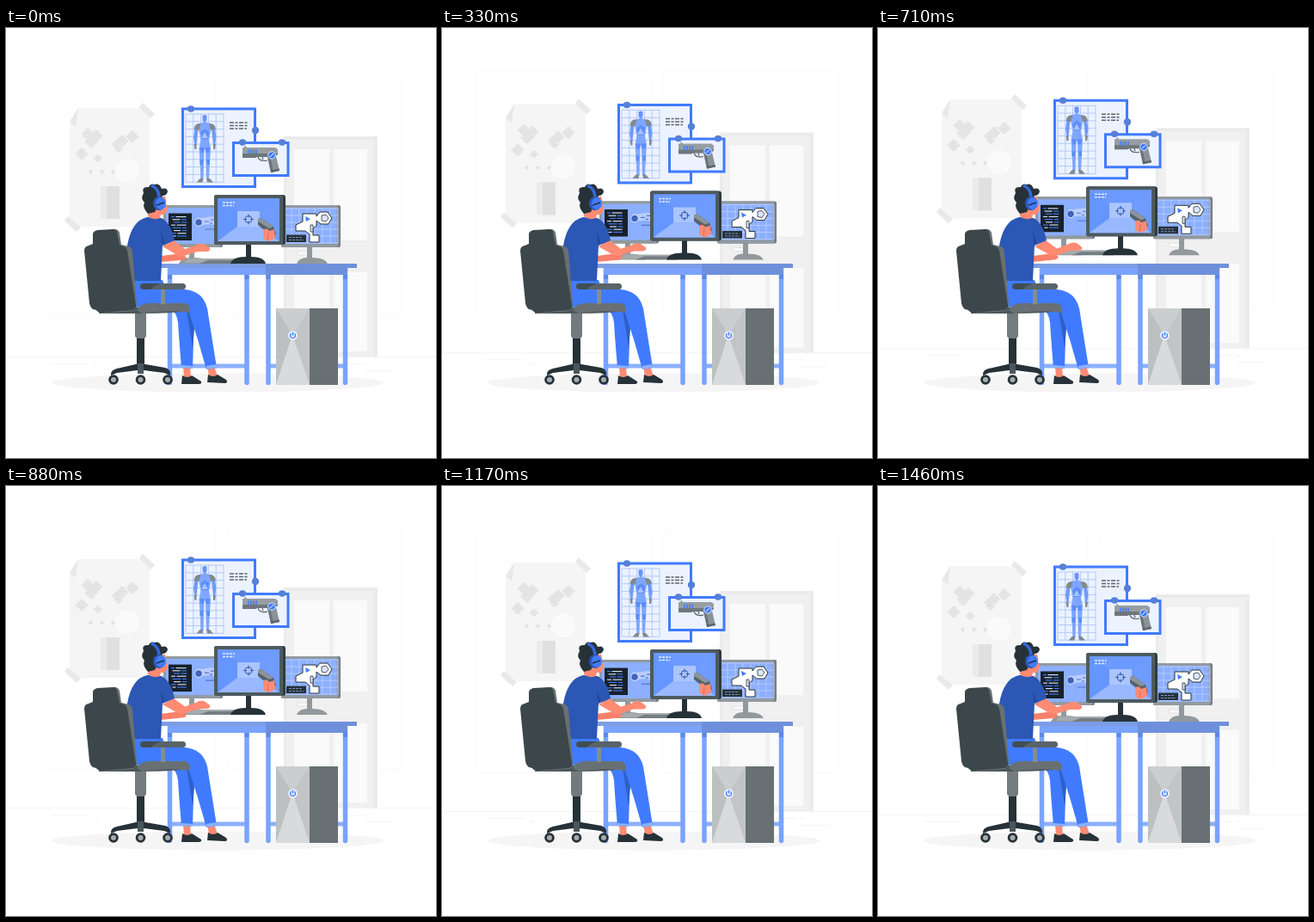
Animation of 500x500 px, one loop 1.5 s. Source, as an HTML page:

```html
<!DOCTYPE html>
<html lang="en">
<head>
<meta charset="utf-8">
<title>Game developer at a desk</title>
<style>
html, body { margin: 0; width: 100%; height: 100%; overflow: hidden; background: #fff; }
svg { display: block; width: 100vw; height: 100vh; }
</style>
</head>
<body>
<svg viewBox="0 0 500 500">
  <ellipse cx="246" cy="412.500" rx="193" ry="11" fill="#f5f5f5"/>

  <g class="float">
    <g fill="none" stroke="#fafafa">
      <rect x="39.500" y="54.500" width="204" height="283" rx="5"/>
      <rect x="256.500" y="54.500" width="204" height="283" rx="5"/>
    </g>
    <path d="M0 382.500H500" stroke="#f0f0f0" stroke-width=".8"/>
    <path d="M417 398.500H449M387 390.500H412M416 390.500H422M53 390.500H96M102 394.500H108" stroke="#f3f3f3" stroke-width=".8"/>

    <!-- door -->
    <path d="M323 126H432V382H323Z" fill="#ebebeb"/>
    <path d="M326 130H428V382H326Z" fill="#f0f0f0"/>
    <path d="M335 141H376V247H335ZM381 141H420V247H381ZM335 284H376V376H335ZM381 284H420V376H381Z" fill="#fafafa"/>
    <path d="M340 262H352" stroke="#e2e2e2" stroke-width="5" stroke-linecap="round"/>
    <path d="M340 262H352" stroke="#fafafa" stroke-width="3" stroke-linecap="round"/>

    <!-- paper poster -->
    <path d="M84 93H167V231H74V109Z" fill="#f5f5f5"/>
    <path d="M84 93L81 115L74 109Z" fill="#e8e8e8"/>
    <path d="M159 87L173 100L168 105L155 92ZM72 219L87 232L82 237L68 224Z" fill="#e9e9e9"/>
    <g id="pixels" fill="#e3e3e3"></g>
    <path d="M96 167H101M98.500 164.500V169.500M109 167H114M111.500 164.500V169.500M122 167H127M124.500 164.500V169.500" stroke="#e0e0e0" stroke-width="1.500"/>
    <circle cx="141" cy="166" r="14" fill="#fafafa"/>
    <path d="M110 184H132V222H110Z" fill="#ebebeb"/>
    <path d="M117 184H132V222H117Z" fill="#e0e0e0"/>

    <!-- blueprint -->
    <path d="M205.500 94H289.500V184.500H205.500Z" fill="#ecf2ff" stroke="#407bff" stroke-width="3"/>
    <path id="plan" fill="none" stroke="#a5c0fa" stroke-width=".8"/>
    <g id="figure"></g>
    <path d="M260 110H281M260 113.500H282M260 117H280" stroke="#59646a" stroke-width="1.400" stroke-dasharray="5 1.500 3 1.500"/>
    <path d="M264.500 133.500H328V171.500H264.500Z" fill="#ecf2ff" stroke="#407bff" stroke-width="3"/>
    <path d="M304 149H314L318 166L308 168Z" fill="#8b9398"/>
    <path d="M304 149H307L311 167.500L308 168Z" fill="#69747a"/>
    <path d="M275 139H277L278 136.500L280 139H313L316 141V147L312 149H275Z" fill="#979da1"/>
    <path d="M275 146H316V147L312 150H292L290 151H275Z" fill="#6d777c"/>
    <path d="M293 150Q295 156 304 154M298 150L299 153" fill="none" stroke="#59656b" stroke-width="1.200"/>
    <path d="M282 141.500V146M285 141.500V146M288 141.500V146M291 141.500V146" stroke="#407bff" stroke-width="1.600"/>
    <circle cx="309" cy="148" r="4.200" fill="#407bff" stroke="#dce7ff"/>
    <path d="M307 150L311 146" stroke="#fff"/>
    <path d="M308 165.500L317.500 163.500L318 166L308 168Z" fill="#58656c"/>
    <g fill="#5680d8">
      <ellipse cx="215" cy="94" rx="4.200" ry="3.700"/><circle cx="290" cy="119" r="4.200"/>
      <ellipse cx="275" cy="133" rx="4.200" ry="3.700"/><ellipse cx="321" cy="133" rx="4.200" ry="3.700"/>
    </g>
  </g>

  <!-- desk -->
  <path d="M190 390.500H280V395.500H190ZM305 390.500H394V395.500H305Z" fill="#8cb0ff"/>
  <path d="M190.500 280V412.500M280 280V412.500M305 280V412.500M394.500 280V412.500" stroke="#79a3ff" stroke-width="5.500" stroke-linecap="round"/>
  <path d="M188 279H397V287H188Z" fill="#79a3ff"/>
  <path d="M188 287H193V292H188ZM277.500 287H282.500V292H277.500ZM302.500 287H307.500V292H302.500ZM392 287H397V292H392Z" fill="#5c88e8"/>
  <path d="M179 274H408V279H179Z" fill="#7c9de4"/>
  <path d="M302 274H408V279H397V287H302Z" fill="#6e90dc"/>

  <!-- tower -->
  <path d="M353 326H386V415H353Z" fill="#687073"/>
  <path d="M314 326H353V415H314Z" fill="#cbcecf"/>
  <path d="M314 326L333 357L314 415Z" fill="#bcc0c1"/>
  <path d="M353 326L333 357L353 415Z" fill="#c1c5c6"/>
  <path d="M314 415L333 357L353 415Z" fill="#d8dadb"/>
  <circle cx="333.500" cy="357.500" r="5.500" fill="#e8eeff"/>
  <path d="M331.600 355.300A3 3 0 1 0 335.400 355.300M333.500 353.500V357.500" fill="none" stroke="#407bff" stroke-width="1.300"/>

  <g class="float">
    <!-- side screens -->
    <g id="sides"></g>
    <path d="M189 215.500H216V247H189Z" fill="#18212a"/>
    <g id="code"></g>
    <path d="M221 226Q220 219 226 221L240 219Q244 220 243 226Q242 231 238 228L228 229Q222 234 221 226Z" fill="#b9cdfd"/>
    <circle cx="224" cy="226" r="4.300" fill="#3f64bc" stroke="#dbe6ff"/>
    <path d="M231 225H236M238 223H242M237 227H240M232 234H243" stroke="#5375c9" stroke-width="1.200"/>
    <path id="grid" fill="none" stroke="#c4d5ff" stroke-width=".7"/>
    <path d="M345 216H361V219L365 214H374L379 221L375 228H366L361 224V230L357 233V241H364V249H353V240L348 236H337V229L345 225Z" fill="#fff" stroke="#263238" stroke-linejoin="round"/>
    <path d="M367 218L372 217L375 221L372 225L367 224ZM354 229H357V237H354Z" fill="#dce6ff" stroke="#263238" stroke-width=".8"/>
    <path d="M348 219L354 222L349 225Z" fill="#407bff"/>
    <path d="M326 240.500H349V249H326Z" fill="#263238"/>
    <path d="M329 243.500H345M329 246.500H346" stroke="#8fa7d8" stroke-width=".8" stroke-dasharray="3 1"/>

    <!-- keyboard -->
    <path d="M212 268H266L274 273H207Z" fill="#a5abad"/>
    <path d="M235 270H266L274 274H225Z" fill="#747d81"/>

    <!-- main screen -->
    <path d="M279 250H285V266Q300 266 302 274H261Q263 266 279 266Z" fill="#263238"/>
    <path d="M244 194H322Q325 194 325 197V249Q325 252 322 252H244Z" fill="#303b40"/>
    <path d="M244 194H320Q322 194 322 196V252H244Q242 252 242 250V196Q242 194 244 194Z" fill="#4d5a60"/>
    <path d="M246 198H318V248H246Z" fill="#6595ff"/>
    <path d="M246 198L269 213H295L318 198Z" fill="#6d9aff"/>
    <path d="M246 248L269 231H295L318 248Z" fill="#9ab8ff"/>
    <path d="M295 213L318 198V248L295 231Z" fill="#709cff"/>
    <path d="M269 213H295V231H269Z" fill="#acc5ff"/>
    <path d="M252 203H266M252 206.500H265" stroke="#e1eaff" stroke-width="1.400" stroke-dasharray="3 1"/>
    <g fill="none" stroke="#355aaa">
      <circle cx="282" cy="222.500" r="4"/>
      <path d="M276 222.500H280M284 222.500H288M282 216.500V220.500M282 224.500V228.500"/>
    </g>
    <path d="M293 222L297 221L311 231L314 240L305 243L301 235L293 229Z" fill="#566269"/>
    <path d="M293 222L297 221L311 231L306 233L293 225Z" fill="#8a9499"/>
    <path d="M299 235Q303 231 306 236L312 234L313 244L306 248L299 245Z" fill="#ff8b73"/>
    <path d="M305 238L304 247" stroke="#d96b60"/>
  </g>

  <!-- chair base -->
  <path d="M152 355H161V394H152Z" fill="#263238"/>
  <path d="M150 330H163V357Q163 361 159 361H154Q150 361 150 357Z" fill="#737b7e"/>
  <path d="M122 404Q121 398 129 396L151 391H162L185 395Q192 397 191 404L184 401L160 398H153L129 401Z" fill="#263238"/>
  <path d="M153 390H160V402H153Z" fill="#4b575d"/>
  <g id="wheels"></g>

  <!-- legs -->
  <path d="M206 393H214L215 407H207Z" fill="#ff8b73"/>
  <path d="M234 393H242L246 405H236Z" fill="#ff8b73"/>
  <path d="M205 404Q211 408 216 404L227 411Q228 414 224 414H204Z" fill="#263238"/>
  <path d="M235 403Q241 407 246 403L256 409Q259 413 254 413L234 412Z" fill="#263238"/>
  <path d="M170 304H202Q222 310 219 331L217 396L204 395Q201 360 200 342Q197 320 170 321Z" fill="#407bff"/>
  <path d="M212 322L220 338L217 372L210 328Z" fill="#2e60cb"/>
  <path d="M146 293H182L186 304H208Q229 306 234 326L245 395L233 397Q224 364 213 331Q207 321 187 321L150 325Z" fill="#407bff"/>
  <path d="M204 392L217 393V396L204 395ZM233 393L244.500 391L245 395L233 397Z" fill="#8cb0ff"/>

  <!-- seat -->
  <path d="M108 325H152Q180 322 213 329Q190 332 160 332H108Z" fill="#4c575b"/>
  <path d="M152 328Q156 318 178 320H208Q216 322 213 331Q188 327 159 332Z" fill="#687073"/>

  <!-- arms -->
  <g id="arms" fill="#ff8b73">
    <path d="M180 265L197 263Q205 261 209 266Q210 270 204 270L180 272Z" fill="#f9806a"/>
    <path d="M182 254L195 247L208 257L220 253Q227 249 232 252L237 256Q238 260 233 260L223 260L207 265Q203 266 199 264Z"/>
  </g>

  <!-- torso and head -->
  <path d="M164 220Q146 224 141 253L146 294H180L182 253L196 247Q192 227 181 221Z" fill="#2c57b4"/>
  <path d="M182 252L180 236L184 250Z" fill="#21448f"/>
  <path d="M166 196H185Q187 200 186 204L188 210L187 213Q186 218 180 217L179 221Q171 224 165 219Z" fill="#ff8b73"/>
  <path d="M165 216Q158 208 161 203Q156 198 160 192Q157 184 166 185Q168 180 173 182Q178 180 181 187Q187 185 188 190Q187 195 182 195Q180 199 178 204L173 214Z" fill="#263238"/>
  <path d="M169 183Q179 187 178 201" fill="none" stroke="#3566d8" stroke-width="3.500"/>
  <ellipse cx="178" cy="204" rx="7" ry="8" fill="#2b56b5"/>
  <ellipse cx="180" cy="204" rx="6" ry="7" fill="#407bff"/>
  <path d="M175 206L184 203" stroke="#263238" stroke-width="1.400"/>

  <!-- chair back and armrest -->
  <path d="M123 234Q130 233 132 238L134 252L143 254Q146 255 147 259L152 320Q153 328 147 329L113 332Z" fill="#687073"/>
  <path d="M96 253L101 251V239Q102 236 106 235L124 234Q128 234 129 237L132 252L137 254Q140 255 141 259L151 322Q152 327 147 328L113 331Q106 331 105 328L101 327Q98 325 97 320L91 259Q91 254 96 253Z" fill="#3c474b"/>
  <path d="M180 302H185V321H180Z" fill="#858c8f"/>
  <rect x="156" y="297" width="53" height="7" rx="3.500" fill="#596468"/>
  <path d="M160 297H180Q170 301 168 304H160Q156 303 156 300Q157 297 160 297Z" fill="#414d52"/>
</svg>
<script>
const $ = id => document.getElementById(id);
const box = (x, y, w, h, fill) => `<rect x="${x}" y="${y}" width="${w}" height="${h}"${fill ? ` fill="${fill}"` : ''}/>`;
const repeat = (n, fn) => Array.from({ length: n }, (_, i) => fn(i)).join('');
const lattice = (x, y, cols, rows, sx, sy) =>
  repeat(cols + 1, i => `M${x + i * sx} ${y}v${rows * sy}`) +
  repeat(rows + 1, i => `M${x} ${y + i * sy}h${cols * sx}`);

$('plan').setAttribute('d', lattice(209, 100, 5, 9, 8.8, 8.8));
$('grid').setAttribute('d', lattice(323, 210, 7, 5, 9, 8));

// stepped diamonds on the poster
const diamond = (x, y, r) => repeat(2 * r + 1, i => {
  const half = r + 1 - Math.abs(i - r);
  return box(x - half * 2.4, y + (i - r) * 2.6, half * 4.8, 2.6);
});
$('pixels').innerHTML = [[95, 122, 2], [105, 124, 2], [99, 131, 2], [128, 134, 1], [135, 130, 2], [131, 139, 1], [147, 125, 2], [88, 145, 2], [107, 150, 1]]
  .map(([x, y, r]) => diamond(x, y, r)).join('');

// armoured figure, one half mirrored
const half = `
  <path d="M231 109L237 111L238 120L236 130L238 140L237 155L236 176H233L232 142H231Z" fill="#7fa6ff"/>
  <path d="M239 117H243L244.500 127L243 136H241L240 127Z" fill="#6f9af8"/>
  <path d="M236 111Q243 110 244 118L238 119ZM241 135H244L243 141H241ZM233 175H237L241 179.500H234Z" fill="#818a90"/>
  <path d="M231 117L236 121L235 129H231ZM232 139H237L236 145H233ZM233 153H237V159H234Z" fill="#5b8cf8"/>`;
$('figure').innerHTML = half + `<g transform="matrix(-1 0 0 1 462.500 0)">${half}</g>
  <path d="M228.500 102Q231 100 233.500 102V107L231 110L228.500 107Z" fill="#6794f6"/>
  <path d="M227 128L231 121L235 128Z" fill="#a7c1ff"/>`;

const screen = x => `
  <path d="M${x + 30} 254h6v13q15 0 18 7h-36q3 -7 12 -7z" fill="#91999c"/>
  <rect x="${x}" y="206" width="69" height="49" rx="2" fill="#737e87"/>
  <rect x="${x}" y="206" width="66.500" height="49" rx="2" fill="#929aa0"/>
  ${box(x + 3, 209, 61.5, 42, '#8cafff')}`;
$('sides').innerHTML = screen(183) + screen(320);

$('code').innerHTML = repeat(8, i => {
  const x = 192 + i % 3 * 1.5, y = 219 + i * 3.2, w = 4 + i * 5 % 7;
  return box(x, y, w, 1.1, i % 2 ? '#dbe5ff' : '#407bff') +
    box(x + w + 1.5, y, 16 - w - i % 3, 1.1, i % 3 ? '#407bff' : '#dbe5ff');
});

$('wheels').innerHTML = [125, 156.5, 188].map(x =>
  `<circle cx="${x}" cy="409" r="5.800" fill="#263238"/><circle cx="${x}" cy="409" r="3" fill="#a5abae"/>`).join('');

// rise and fall, then a short rest before the loop restarts
const LOOP = 1500, MOVE = 1460, RISE = 10;
const floats = document.querySelectorAll('.float');
function draw() {
  const p = Math.min(performance.now() % LOOP / MOVE, 1);
  const lift = 1 - Math.abs(1 - 2 * p);
  floats.forEach(g => g.setAttribute('transform', `translate(0 ${-RISE * lift})`));
  $('arms').setAttribute('transform', `rotate(${-1.5 * lift} 184 256)`);
  requestAnimationFrame(draw);
}
draw();
</script>
</body>
</html>
```
